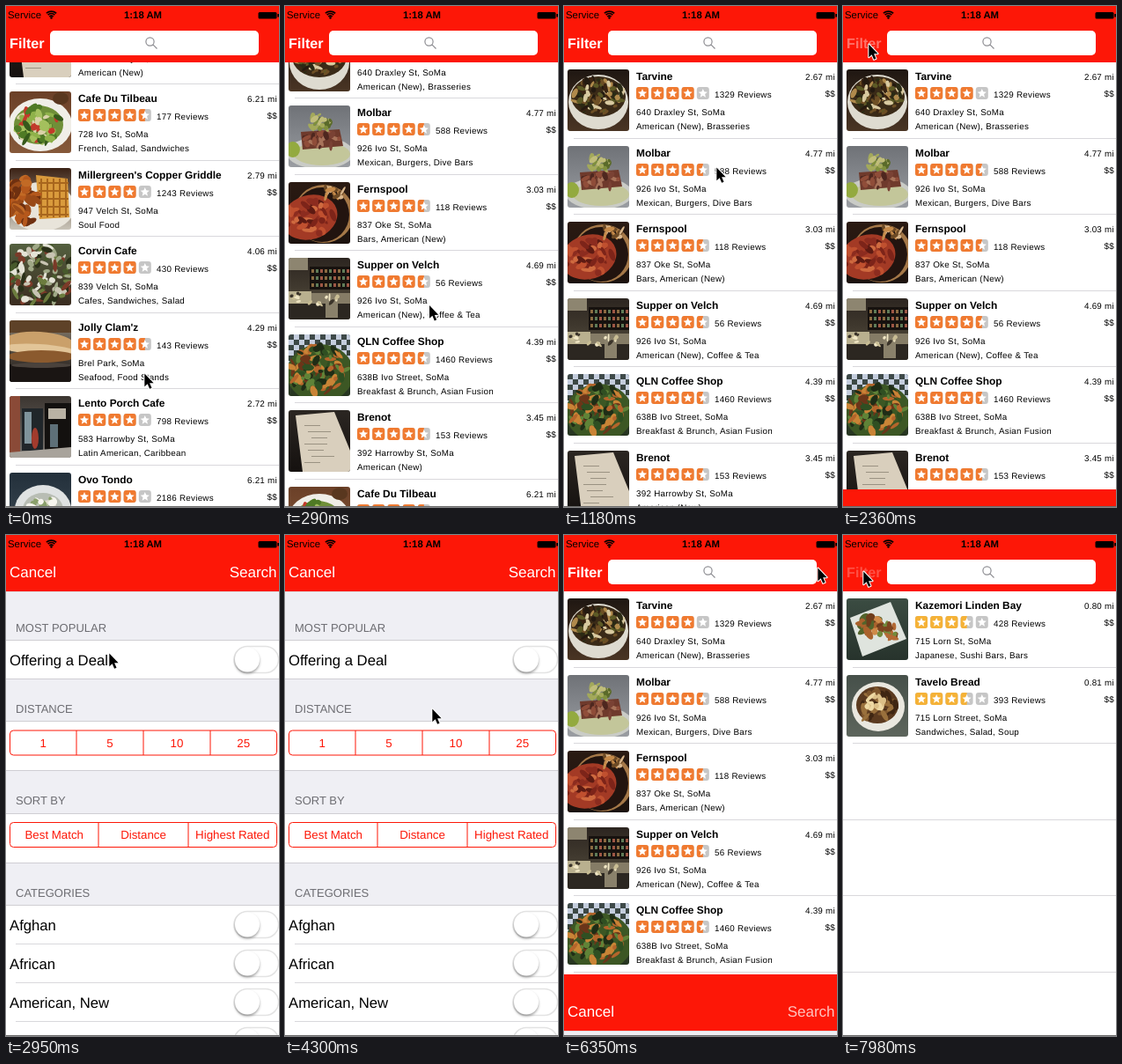
Recreate the animation shown at these times as an HTML page with a canvas. Size 310 by 569 pixels, loop 8000 ms.

```html
<!DOCTYPE html>
<html lang="en">
<head>
<meta charset="utf-8">
<title>Restaurant search</title>
<style>
html, body { margin: 0; width: 100%; height: 100%; overflow: hidden; background: #fff; }
canvas { display: block; width: 310px; height: 569px; }
</style>
</head>
<body>
<canvas id="stage"></canvas>
<script>
const W = 310, H = 569, LOOP = 8000, TICK = 147.8;
const RED = '#fd1707', ROW = 86.5, NAV = 64;
const FONT = '"Liberation Sans", Arial, sans-serif';
const dpr = window.devicePixelRatio || 1;
const stage = document.getElementById('stage');
stage.width = W * dpr;
stage.height = H * dpr;
let g = stage.getContext('2d');
g.textRendering = 'geometricPrecision';

// ---- drawing helpers ----
function rect(c, x, y, w, h) { g.fillStyle = c; g.fillRect(x, y, w, h); }

function oval(c, x, y, rx, ry, turn = 0) {
  g.fillStyle = c;
  g.beginPath();
  g.ellipse(x, y, rx, ry, turn, 0, 7);
  g.fill();
}

function poly(c, ...pts) {
  g.fillStyle = c;
  g.beginPath();
  for (let i = 0; i < pts.length; i += 2) g.lineTo(pts[i], pts[i + 1]);
  g.closePath();
  g.fill();
}

function round(x, y, w, h, r) { g.beginPath(); g.roundRect(x, y, w, h, r); }

function put(s, x, y, size, color = '#000', align = 'left', weight = '') {
  g.font = `${weight} ${size}px ${FONT}`;
  g.fillStyle = color;
  g.textAlign = align;
  g.fillText(s, x, y);
}

// Small print is set slightly open.
function small(s, x, y, align) {
  g.letterSpacing = '0.28px';
  put(s, x, y, 9.8, '#000', align);
  g.letterSpacing = '0px';
}

function fade(c1, c2) {
  const f = g.createLinearGradient(0, 0, 0, 70);
  f.addColorStop(0, c1);
  f.addColorStop(1, c2);
  g.fillStyle = f;
  g.fillRect(0, 0, 70, 70);
}

// Scatter small morsels inside an ellipse.
function bits(colors, n, x, y, rx, ry, size) {
  let seed = n * 7919 + colors.length;
  const rnd = () => (seed = (seed * 16807) % 2147483647) / 2147483647;
  rnd();
  for (let i = 0; i < n; i++) {
    const a = rnd() * 6.28, d = Math.sqrt(rnd());
    oval(colors[i % colors.length], x + Math.cos(a) * d * rx, y + Math.sin(a) * d * ry,
      size * (0.5 + rnd()), size * (0.3 + rnd() * 0.5), rnd() * 3);
  }
}

// ---- thumbnails ----
const dishes = {
  bowl() {
    fade('#1f1712', '#4a3524');
    oval('#dedbd0', 35, 37, 34, 31);
    oval('#3a2a17', 35, 31, 31, 23);
    bits(['#6d4f25', '#2b2a14', '#b08a4c', '#3a2412', '#5d5a26', '#d8c9a0', '#241a10'], 90, 35, 30, 28, 20, 4);
  },
  taco() {
    fade('#6f7277', '#9a9da2');
    oval('#c9cbc6', 36, 54, 38, 18);
    oval('#c3c69a', 38, 55, 32, 13);
    poly('#6f3a2c', 14, 30, 58, 27, 62, 46, 16, 50);
    bits(['#4e271f', '#8f4d39', '#7a4234', '#a8735a'], 34, 37, 39, 21, 9, 4);
    bits(['#7f8f3e', '#a3a95a', '#5a6a2a', '#c0bd7a'], 26, 36, 19, 14, 10, 4);
    oval('#93aa3f', 5, 50, 8, 9);
  },
  roast() {
    fade('#2a1a12', '#1c120e');
    oval('#a57848', 40, 36, 34, 33);
    oval('#22140f', 38, 37, 31, 31);
    oval('#a33a25', 24, 40, 32, 25, -0.3);
    bits(['#c0502f', '#7d2419', '#cf6a3f', '#8c2c1f', '#5d1a12'], 44, 24, 40, 28, 20, 5);
    bits(['#d8b58a', '#6d4a25', '#c58a4a'], 14, 50, 12, 14, 7, 4);
  },
  cafe() {
    fade('#2c2520', '#57503f');
    rect('#8d8570', 0, 0, 22, 14);
    rect('#17120f', 24, 10, 46, 26);
    for (let i = 0; i < 27; i++)
      rect(['#8b6b42', '#5f7b58', '#9d5644'][i % 3], 26 + (i % 9) * 5, 13 + Math.floor(i / 9) * 8, 3, 4);
    rect('#b9b08f', 0, 38, 26, 14);
    rect('#857c66', 26, 40, 44, 12);
    rect('#2c2721', 0, 52, 70, 18);
    rect('#8a816b', 42, 46, 14, 22);
    bits(['#f0e6c4', '#c9bd94', '#3b342a'], 18, 28, 45, 32, 8, 3);
  },
  noodles() {
    fade('#3f4a4a', '#26351f');
    for (let i = 0; i < 72; i++)
      if ((i + Math.floor(i / 12)) % 2) rect('#c4cddd', (i % 12) * 6, Math.floor(i / 12) * 6, 6, 6);
    oval('#3c5724', 36, 44, 38, 33);
    bits(['#b4652b', '#2f4f22', '#c98436', '#6b3519', '#5f8338', '#1f2d16'], 110, 34, 40, 32, 26, 5);
  },
  menu() {
    fade('#2b2622', '#15110f');
    poly('#d9cfbd', 8, 6, 52, 2, 70, 46, 70, 70, 16, 70);
    for (let i = 0; i < 7; i++) rect('#9a9282', 18 + (i % 3) * 4, 17 + i * 7, 18 + (i % 2) * 8, 1);
  },
  salad() {
    fade('#6b4028', '#86593a');
    oval('#f0eee8', 35, 38, 36, 30);
    oval('#59371f', 58, 8, 9, 7);
    oval('#6f8f38', 33, 38, 28, 22);
    bits(['#4f7a25', '#8fb24a', '#c23a2a', '#d9d2a8', '#36591b', '#a4c05d'], 62, 33, 38, 26, 20, 6);
  },
  waffle() {
    fade('#3b2215', '#c9c4b8');
    oval('#e8e4da', 36, 44, 38, 28);
    poly('#d99a3c', 30, 8, 66, 12, 68, 56, 34, 58);
    for (let i = 0; i < 5; i++) {
      rect('#a8661d', 33, 16 + i * 9, 34, 2);
      rect('#a8661d', 35 + i * 7, 12, 2, 44);
    }
    bits(['#9a4a18', '#c26a25', '#6f3010', '#b5581c'], 46, 16, 36, 17, 28, 7);
  },
  pizza() {
    fade('#54603f', '#3a2c20');
    bits(['#e4e3d6', '#47592c', '#7b3a28', '#2a3019', '#9fa886', '#6c7c3e', '#c8c4b2'], 120, 35, 36, 40, 34, 5);
  },
  roll() {
    fade('#8b8171', '#16110f');
    rect('#5e4228', 0, 0, 70, 14);
    oval('#caa06a', 34, 26, 40, 13, 0.06);
    oval('#e2c598', 34, 33, 40, 6, 0.06);
    oval('#8b5a2e', 36, 41, 38, 7);
    rect('#1a1513', 0, 50, 70, 20);
    oval('#4a423c', 36, 51, 34, 3);
  },
  street() {
    fade('#3b3530', '#77726d');
    rect('#8a4a37', 0, 0, 12, 70);
    rect('#20262a', 14, 14, 24, 48);
    rect('#7f949c', 17, 18, 8, 36);
    rect('#13110f', 40, 8, 30, 56);
    rect('#b9b2a4', 44, 14, 20, 12);
    rect('#5e7078', 46, 32, 9, 26);
    oval('#a23b2d', 29, 48, 4, 12);
    poly('#a8a39b', 0, 64, 70, 58, 70, 70, 0, 70);
  },
  cream() {
    fade('#23303b', '#3b4853');
    oval('#dfe2e2', 38, 42, 32, 28);
    oval('#b8bdb4', 38, 42, 23, 19);
    bits(['#f6f5ee', '#e2dfcf', '#8aa06b'], 22, 38, 38, 15, 11, 6);
  },
  fish() {
    fade('#3b4c42', '#27332c');
    poly('#dfe4de', 4, 22, 50, 4, 68, 46, 18, 66);
    bits(['#a9622d', '#6e3d1c', '#cf8a48', '#52642b'], 30, 28, 30, 13, 10, 6);
    bits(['#b36a35', '#7d4520', '#728a3c'], 20, 48, 38, 11, 8, 5);
  },
  soup() {
    fade('#46504a', '#5d655c');
    oval('#e9e7df', 36, 36, 30, 28);
    oval('#5b3a1f', 35, 34, 24, 21);
    bits(['#7d552c', '#3f2612', '#99703c'], 36, 35, 35, 21, 18, 5);
    bits(['#eed9a4', '#dcc088'], 14, 32, 30, 12, 9, 5);
  }
};

function thumb(name) {
  const c = document.createElement('canvas');
  c.width = c.height = 70 * dpr;
  const main = g;
  g = c.getContext('2d');
  g.scale(dpr, dpr);
  round(0, 0, 70, 70, 3);
  g.clip();
  dishes[name]();
  g = main;
  return c;
}

// ---- data ----
const place = (pic, name, stars, reviews, street, kind, miles) =>
  ({ pic: thumb(pic), name, stars, reviews, street, kind, miles });

const nearby = [
  place('bowl', 'Tarvine', 4, 1329, '640 Draxley St', 'American (New), Brasseries', '2.67'),
  place('taco', 'Molbar', 4.5, 588, '926 Ivo St', 'Mexican, Burgers, Dive Bars', '4.77'),
  place('roast', 'Fernspool', 4.5, 118, '837 Oke St', 'Bars, American (New)', '3.03'),
  place('cafe', 'Supper on Velch', 4.5, 56, '926 Ivo St', 'American (New), Coffee & Tea', '4.69'),
  place('noodles', 'QLN Coffee Shop', 4.5, 1460, '638B Ivo Street', 'Breakfast & Brunch, Asian Fusion', '4.39'),
  place('menu', 'Brenot', 4.5, 153, '392 Harrowby St', 'American (New)', '3.45'),
  place('salad', 'Cafe Du Tilbeau', 4.5, 177, '728 Ivo St', 'French, Salad, Sandwiches', '6.21'),
  place('waffle', "Millergreen's Copper Griddle", 4, 1243, '947 Velch St', 'Soul Food', '2.79'),
  place('pizza', 'Corvin Cafe', 4, 430, '839 Velch St', 'Cafes, Sandwiches, Salad', '4.06'),
  place('roll', "Jolly Clam'z", 4.5, 143, 'Brel Park', 'Seafood, Food Stands', '4.29'),
  place('street', 'Lento Porch Cafe', 4, 798, '583 Harrowby St', 'Latin American, Caribbean', '2.72'),
  place('cream', 'Ovo Tondo', 4, 2186, '614 Alvey St', 'Italian, Pizza', '6.21')
];
const found = [
  place('fish', 'Kazemori Linden Bay', 3.5, 428, '715 Lorn St', 'Japanese, Sushi Bars, Bars', '0.80'),
  place('soup', 'Tavelo Bread', 3.5, 393, '715 Lorn Street', 'Sandwiches, Salad, Soup', '0.81')
];

// ---- result list ----
function starBox(x, y, part, color) {
  g.fillStyle = '#c6c6c6';
  round(x, y, 14, 14, 3);
  g.fill();
  if (part > 0) {
    g.fillStyle = color;
    round(x, y, 14 * part, 14, part < 1 ? [3, 0, 0, 3] : 3);
    g.fill();
  }
  g.fillStyle = '#fff';
  g.beginPath();
  for (let i = 0; i < 10; i++) {
    const r = i % 2 ? 2.4 : 5.4, a = i * Math.PI / 5;
    g.lineTo(x + 7 + Math.sin(a) * r, y + 7.3 - Math.cos(a) * r);
  }
  g.fill();
}

function drawRow(p, y) {
  g.drawImage(p.pic, 4, y + 8, 70, 70);
  put(p.name, 82, y + 20, 11.9, '#000', 'left', 'bold');
  const color = p.stars < 4 ? '#f5b237' : '#f07a30';
  for (let i = 0; i < 5; i++)
    starBox(82 + i * 17.2, y + 28, Math.max(0, Math.min(1, p.stars - i)), color);
  small(p.reviews + ' Reviews', 171, y + 40);
  small(p.street + ', SoMa', 82, y + 60);
  small(p.kind, 82, y + 76);
  small(p.miles + ' mi', 308, y + 20, 'right');
  small('$$', 308, y + 39, 'right');
}

function drawList(rows, scroll) {
  rect('#fff', 0, 0, W, H);
  for (let i = 0; i < Math.max(rows.length, 6); i++) {
    const top = NAV + ROW * i - scroll;
    if (top < -ROW || top > H) continue;
    if (rows[i]) drawRow(rows[i], Math.round(top));
    const inset = rows[i] ? 11 : 0;
    rect('#d9d8dc', inset, Math.round(top + ROW) - 1, W - inset, 1);
  }
}

function drawNav(alpha) {
  rect(RED, 0, 0, W, NAV);
  g.globalAlpha = alpha;
  put('Filter', 4, 48, 16.2, '#fff', 'left', 'bold');
  g.globalAlpha = 1;
  g.fillStyle = '#fff';
  round(50, 28, 237, 28, 5);
  g.fill();
  g.strokeStyle = '#8e8e93';
  g.lineWidth = 1.2;
  g.beginPath();
  g.arc(163.5, 40.5, 4.6, 0, 7);
  g.moveTo(166.9, 43.9);
  g.lineTo(171.5, 48.5);
  g.stroke();
}

function drawStatus() {
  put('Service', 2, 14, 11.4);
  put('1:18 AM', 155.5, 14, 11.3, '#000', 'center', 'bold');
  g.strokeStyle = '#000';
  g.lineWidth = 1.7;
  for (const r of [3.2, 5.8, 8.4]) {
    g.beginPath();
    g.arc(51.5, 14.5, r, -2.3, -0.84);
    g.stroke();
  }
  oval('#000', 51.5, 13.5, 1.2, 1.2);
  g.fillStyle = '#000';
  round(286.5, 7, 21, 7.5, 1.5);
  g.fill();
  rect('#000', 308.3, 9, 1.7, 3.5);
}

// ---- filter sheet ----
function band(y, h) {
  rect('#fff', 0, y, W, h);
  rect('#cfced3', 0, y, W, 1);
  rect('#cfced3', 0, y + h, W, 1);
}

function toggleRow(label, mid) {
  put(label, 4, mid + 6, 16.7);
  g.strokeStyle = '#e3e3e3';
  g.lineWidth = 1.5;
  round(259, mid - 15, 50.5, 30, 15);
  g.stroke();
  g.save();
  g.shadowColor = 'rgba(0,0,0,.35)';
  g.shadowBlur = 3 * dpr;
  g.shadowOffsetY = 2 * dpr;
  oval('#fff', 274, mid, 14, 14);
  g.restore();
}

function segments(y, edges, labels, chosen) {
  const left = edges[0], right = edges[edges.length - 1];
  g.save();
  round(left, y, right - left, 28, 4);
  g.strokeStyle = RED;
  g.lineWidth = 1;
  g.stroke();
  g.clip();
  labels.forEach((label, i) => {
    const a = edges[i], b = edges[i + 1];
    if (i === chosen) rect(RED, a, y, b - a, 28);
    if (i) rect(RED, a - 0.5, y, 1, 28);
    put(label, (a + b) / 2, y + 18.7, 13.3, i === chosen ? '#fff' : RED, 'center');
  });
  g.restore();
}

function drawSheet(y, chosen, alpha) {
  g.save();
  g.translate(0, y);
  rect('#efeff4', 0, 0, W, H);
  rect(RED, 0, 0, W, NAV);
  rect('#cfc4c8', 0, NAV, W, 0.5);
  put('Cancel', 4, 48, 17, '#fff');
  g.globalAlpha = alpha;
  put('Search', 307.5, 48, 17, '#fff', 'right');
  g.globalAlpha = 1;

  const head = (s, base) => put(s, 11, base, 13, '#6d6d72');
  head('MOST POPULAR', 109.5);
  band(119, 44);
  toggleRow('Offering a Deal', 141.5);
  head('DISTANCE', 201.5);
  band(211, 56);
  segments(222, [4.5, 80, 156, 232, 307.5], ['1', '5', '10', '25'], chosen);
  head('SORT BY', 306);
  band(316, 56);
  segments(326.5, [4.5, 105, 207, 307.5], ['Best Match', 'Distance', 'Highest Rated'], -1);
  head('CATEGORIES', 410.5);
  band(420, 160);
  ['Afghan', 'African', 'American, New', 'American, Traditional'].forEach((s, i) => {
    toggleRow(s, 442.5 + 44 * i);
    rect('#d9d8dc', 11, 464 + 44 * i, W, 1);
  });
  g.restore();
}

// ---- pointer: [tick, x, y] ----
const path = [
  [0, 156, 416], [5, 175, 196], [8, 172, 182], [9, 172, 182], [14, 28, 42],
  [17, 28, 42], [20, 116, 133], [22, 116, 133], [25, 200, 167], [28, 200, 167],
  [29, 166, 196], [32, 48, 224], [34, 50, 224], [41, 287, 36], [47, 287, 36],
  [50, 170, 56], [54, 22, 40]
];

function pointerAt(k) {
  let i = 0;
  while (i < path.length - 2 && path[i + 1][0] <= k) i++;
  const [ka, xa, ya] = path[i], [kb, xb, yb] = path[i + 1];
  const u = Math.min(1, (k - ka) / (kb - ka)), e = u * u * (3 - 2 * u);
  return [xa + (xb - xa) * e, ya + (yb - ya) * e];
}

function drawPointer([x, y]) {
  g.save();
  g.translate(x + 0.8, y + 1);
  g.scale(1.05, 1.05);
  g.strokeStyle = '#fff';
  g.lineWidth = 2;
  g.lineJoin = 'round';
  g.beginPath();
  for (const [px, py] of [[0.5, 0.5], [0.5, 14.5], [3.7, 11.6], [6, 17], [8.3, 16], [6, 10.8], [10.3, 10.6]])
    g.lineTo(px, py);
  g.closePath();
  g.stroke();
  g.fillStyle = '#000';
  g.fill();
  g.restore();
}

// ---- motion, in seconds ----
function spring(t) {
  const x = 17 * Math.max(0, t);
  return 1 - (1 + x) * Math.exp(-x);
}

// Flick to the top, then a damped bounce.
function scrollAt(t) {
  if (t < 0.33) return 494 - 1694 * t + 597 * t * t;
  const x = t - 0.33;
  return -1300 * x * Math.exp(-10.4 * x);
}

function filterAlpha(t) {
  if (t > 7.95) return 0.25;
  return t > 2.2 && t < 6 ? 0.4 : 1;
}

function draw(ms) {
  // The screen refreshes in coarse ticks.
  const k = Math.floor((ms + 12) / TICK), t = k * TICK / 1000;
  g.setTransform(dpr, 0, 0, dpr, 0, 0);
  if (t > 6.6) drawList(found, 0);
  else drawList(nearby, scrollAt(t));
  drawNav(filterAlpha(t));

  const y = Math.round(H * (1 - spring(t - 2.3475) + spring(t - 6.142)));
  if (t > 2.34 && y < H && t < 6.6) {
    const alpha = t < 6 ? 1 : Math.min(1, 0.3 + 1.5 * (t - 6.06));
    drawSheet(y, t > 5 ? 0 : -1, alpha);
  }
  drawStatus();
  rect('#6b6b6b', 0, H - 1, W, 1);
  drawPointer(pointerAt(k));
}

function loop() {
  draw(performance.now() % LOOP);
  requestAnimationFrame(loop);
}
loop();
</script>
</body>
</html>
```
